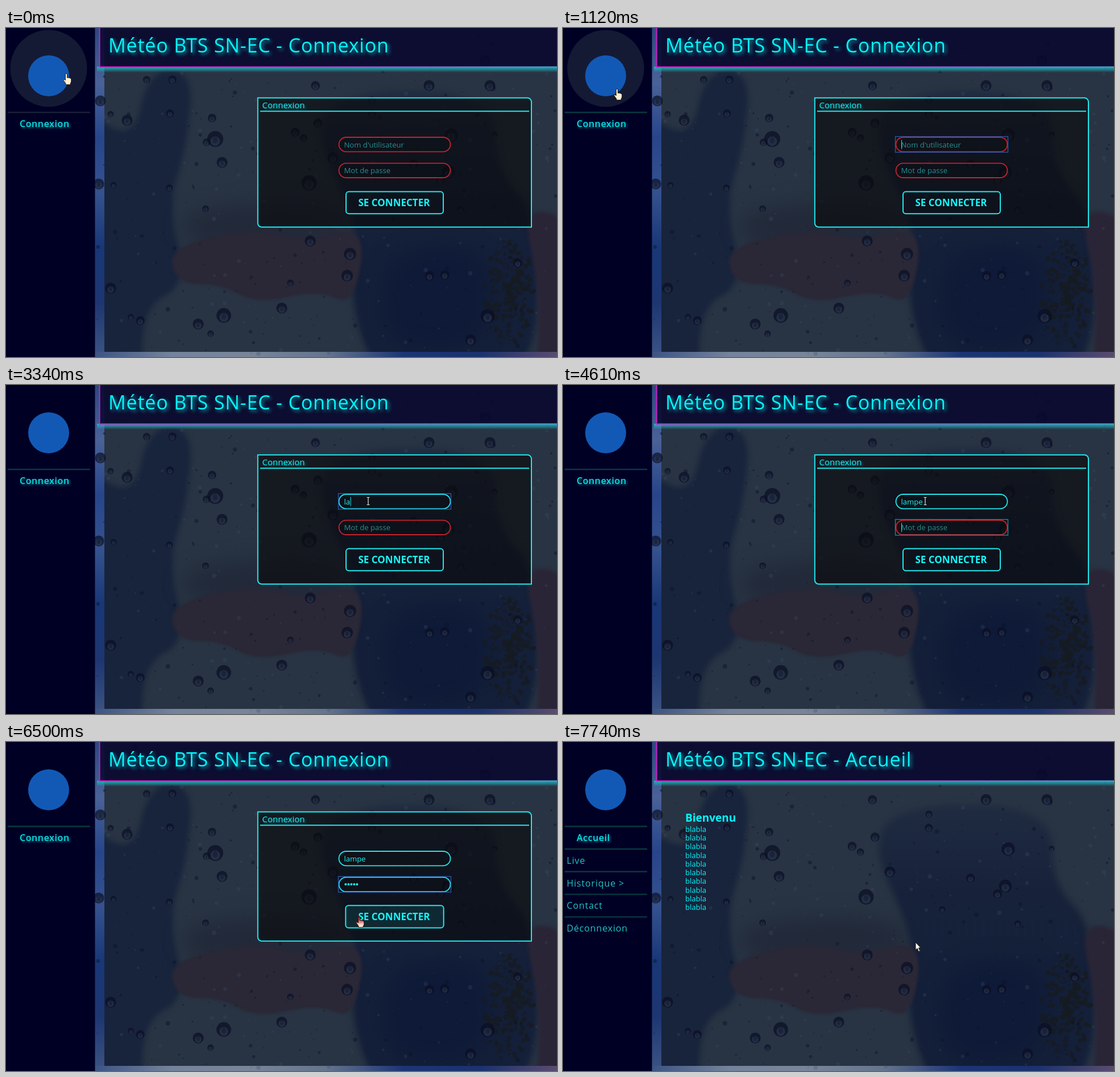
Recreate the animation shown at these times as an HTML page with a canvas. Size 969 by 578 pixels, loop 8000 ms.

```html
<!DOCTYPE html>
<html lang="fr">
<head>
<meta charset="utf-8">
<title>Météo - Connexion</title>
<style>
html, body { margin: 0; width: 100%; height: 100%; overflow: hidden; background: #000025; }
canvas, svg { position: absolute; left: 0; top: 0; width: 969px; height: 578px; }
text { font-family: "Open Sans", "Noto Sans", sans-serif; fill: #18f4f6; white-space: pre; }
.title { font-size: 34px; letter-spacing: .82px; fill: #05f6fb; filter: drop-shadow(3px 3px 3px #079aa5); }
.here { font-size: 16px; font-weight: 600; letter-spacing: .6px; fill: #08dfe2; filter: drop-shadow(2px 2px 2px #067f8c); }
.menu { font-size: 16px; font-weight: 500; letter-spacing: .85px; fill: #22c6c6; }
.legend { font-size: 15px; filter: drop-shadow(2px 2px 2px #067f8c); }
.field { font-size: 13.1px; font-weight: 500; }
.hint { font-weight: 400; fill: #298d90; }
.btn { font-size: 17px; font-weight: 700; }
.h { font-size: 19px; font-weight: 700; fill: #02f8fc; }
.p { font-size: 13px; font-weight: 500; fill: #02f8fc; }
.rule { stroke: #08383f; stroke-width: 2.4; }
.edge { fill: none; stroke: #20e8ec; stroke-width: 2; }
.box { fill: rgba(0,0,0,.12); stroke-width: 1.8; }
.ring { fill: none; stroke-width: 1.3; }
.caret { stroke: #20e8ec; }
</style>
</head>
<body>
<canvas id="photo" width="969" height="578"></canvas>
<svg viewBox="0 0 969 578">
  <defs>
    <linearGradient id="line"><stop stop-color="#d01ec8"/><stop offset=".45" stop-color="#a045c4"/><stop offset="1" stop-color="#4a9cc8"/></linearGradient>
    <linearGradient id="glow" x2="0" y2="1"><stop stop-color="#22c2cc" stop-opacity=".9"/><stop offset=".5" stop-color="#22a8b8" stop-opacity=".6"/><stop offset="1" stop-color="#22a8b8" stop-opacity="0"/></linearGradient>
    <linearGradient id="hot" x2="0" y2="1"><stop stop-color="#c80f0f"/><stop offset=".35" stop-color="#d8453c"/><stop offset=".75" stop-color="#f4d8cc"/><stop offset="1" stop-color="#fff4e8"/></linearGradient>
  </defs>

  <rect width="156.5" height="578" fill="#000025"/>
  <circle id="halo" cx="75" cy="71" r="67.5" fill="#141a34"/>
  <circle cx="75" cy="84" r="36" fill="#1259b6"/>
  <rect id="item" x="2.5" y="148" width="145.5" height="39" fill="#17163c"/>
  <path id="rule" class="rule" d="M3 148.3H148"/>
  <text id="here" class="here" x="24" y="174"></text>

  <rect x="160" y="68" width="809" height="10" fill="url(#glow)"/>
  <rect x="164" width="805" height="69" fill="#08082e" fill-opacity=".86"/>
  <rect x="164" y="67.4" width="805" height="2" fill="url(#line)"/>
  <rect x="163.6" width="2" height="69.4" fill="#cc1ec6"/>
  <text id="title" class="title" x="180" y="43"></text>

  <g id="login">
    <path class="edge" style="fill:rgba(11,12,14,.66)" d="M442.8 122.8H917a7 7 0 0 1 7 7V349.8H449.8a7 7 0 0 1-7-7Z"/>
    <path class="edge" d="M447 146.2H920"/>
    <text class="legend" x="450.5" y="141">Connexion</text>
    <rect class="box" id="userBox" x="585.5" y="192" width="196" height="25.4" rx="12.7"/>
    <rect class="box" id="passBox" x="585.5" y="237.6" width="196" height="25.4" rx="12.7"/>
    <rect class="ring" id="ring" x="584.5" width="198" height="27.6"/>
    <text class="field" id="user" x="594.5" y="209.5"></text>
    <text class="field" id="pass" x="594.5" y="255"></text>
    <g id="dots" fill="#18f4f6"></g>
    <path class="caret" id="caret"/>
    <rect id="button" class="edge" rx="5"/>
    <text id="label" class="btn" x="619.5" y="313">SE CONNECTER</text>
  </g>
  <g id="home"></g>

  <g id="cursor" stroke-linejoin="round">
    <path id="arrow" d="M0 0V13.4L3.1 10.6 5.4 16.2 7.8 15.2 5.4 9.8H9.2Z" fill="#fff8e8" stroke="#111" stroke-width=".9"/>
    <path id="hand" d="M-1.6 1Q0-1 1.6 1V7.4Q3 6.4 4.2 7.6 5.8 6.8 6.6 8.4 8.4 7.8 8.8 10V14Q8.4 16 7.2 17.4V19.6H-1V17.4L-5.2 11.6Q-5.2 9.4-3 10.4L-1.6 12Z" stroke="#16100c" stroke-width=".9"/>
    <path id="beam" d="M-2.5-6.5H2.5M-2.5 6.5H2.5M0-6.5V6.5" fill="none" stroke="#e8e8e0" stroke-width="1.2"/>
  </g>
</svg>
<script>
const $ = id => document.getElementById(id);
const LOOP = 8000, NAME = "lampe", RED = "#c4222c", CYAN = "#20e8ec", BLUE = "#2c58ac", TEAL = "#1f8f96";

// Rainy window: soft colour patches, then drops
const g = $("photo").getContext("2d");
let seed = 17;
const rnd = () => (seed = seed * 16807 % 2147483647) / 2147483647;

function fade(x0, y0, x1, y1, colors) {
  const grad = g.createLinearGradient(x0, y0, x1, y1);
  colors.forEach((c, i) => grad.addColorStop(i / (colors.length - 1), c));
  return grad;
}
function blob(fill, soft, ...pts) {
  const n = pts.length;
  const mid = i => [0, 1].map(k => (pts[i % n][k] + pts[(i + 1) % n][k]) / 2);
  g.filter = `blur(${soft}px)`;
  g.fillStyle = fill;
  g.beginPath();
  g.moveTo(...mid(n - 1));
  for (let i = 0; i < n; i++) g.quadraticCurveTo(...pts[i], ...mid(i));
  g.fill();
  g.filter = "none";
}
function disc(color, x, y, rx, ry = rx) {
  g.fillStyle = color;
  g.beginPath();
  g.ellipse(x, y, rx, ry, 0, 0, 7);
  g.fill();
}
function drop(x, y, r) {
  disc("rgba(9,14,36,.68)", x, y, r);
  disc("rgba(46,60,84,.6)", x, y + r * .28, r * .6);
  disc("rgba(16,23,46,.5)", x, y + r * .15, r * .3, r * .4);
}

g.fillStyle = "#283443";
g.fillRect(156, 0, 813, 578);
blob("#18243c", 5, [250,75], [330,75], [318,210], [285,310], [320,450], [240,490], [240,640], [130,620], [130,140], [225,200]);
blob("#222a3a", 16, [310,310], [600,300], [610,390], [310,390]);
blob(fade(0, 130, 0, 400, ["#1e2a40", "#17223a", "#141f39"]), 6,
  [530,160], [640,105], [860,120], [860,250], [940,330], [930,640], [660,640], [600,470], [625,360]);
blob("#2a2736", 2, [285,385], [440,350], [520,375], [635,345], [612,490], [550,460], [440,485], [380,450], [300,450]);
blob("#0e1a37", 20, [660,400], [850,380], [850,560], [670,570]);
blob("#2a2536", 3, [905,310], [1010,340], [1010,640], [930,640], [940,460]);
for (let i = 0; i < 240; i++) {
  const a = rnd() * 6.28, d = rnd() ** .7;
  disc("rgba(22,27,34,.8)", 884 + Math.cos(a) * d * 44, 465 + Math.sin(a) * d * 95, 1.5 + rnd() * 3);
}
g.fillStyle = fade(0, 0, 0, 578, ["#2c4880", "#4a6298", "#27458a", "#35528f", "#193777", "#1d3672", "#3c5484"]);
g.fillRect(156, 0, 17, 578);
g.fillStyle = fade(156, 0, 969, 0, ["#3c5484", "#74839c", "#788599", "#65758e", "#1c3575", "#1a326e", "#5a4c70"]);
g.fillRect(156, 569, 813, 9);

for (let i = 0; i < 430; i++) {
  disc(rnd() < .6 ? "rgba(10,17,40,.45)" : "rgba(62,78,108,.28)", 158 + rnd() * 811, rnd() * 572, 1 + 3 * rnd() ** 3);
}
for (let i = 0; i < 28; i++) drop(180 + rnd() * 780, 80 + rnd() * 480, 5 + rnd() * 3);
[[368,195], [533,272], [383,505], [847,506], [783,188], [778,253], [605,397], [600,435], [535,374], [485,492], [338,520],
 [380,236], [575,228], [842,57], [851,101], [744,101], [213,162], [184,457], [817,548], [166,128], [163,274]]
  .forEach(([x, y], i) => drop(x, y, 14 - Math.min(i, 8) * .55));

// Repeated parts
$("dots").innerHTML = Array.from(NAME, (_, i) => `<circle cx="${597.3 + 5 * i}" cy="250" r="2"/>`).join("");
$("home").innerHTML = '<text class="h" x="215" y="140">Bienvenu</text>' +
  Array.from({ length: 10 }, (_, i) => `<text class="p" x="215" y="${158 + 15.22 * i}">blabla</text>`).join("") +
  ["Live", "Historique >", "Contact", "Déconnexion"].map((s, i) => {
    const y = 188 + 39.8 * i;
    return `<path class="rule" d="M3 ${y}H148"/><text class="menu" x="6.5" y="${y + 25.7}">${s}</text>`;
  }).join("");

// Cursor legs: start, end, number of jumps, goal
const PATH = [
  [160, 590, 4, 95, 107],
  [1260, 1960, 6, 544, 195],
  [2230, 2630, 4, 637, 204],
  [6200, 6500, 3, 621, 306],
  [6620, 7200, 6, 675, 318],
  [7600, 7740, 2, 620, 352]
];

const within = (t, a, b) => t >= a && t < b;
// Progress 0..1 in n equal jumps, the first at a, the last at b
const jumps = (t, a, b, n) => t < a ? 0 : Math.min(n, 1 + Math.floor((t - a) * (n - 1) / (b - a) + 1e-6)) / n;

function cursorAt(t) {
  let x = 106, y = 80;
  for (const [a, b, n, gx, gy] of PATH) {
    const p = jumps(t, a, b, n) ** 2;
    x += (gx - x) * p;
    y += (gy - y) * p;
  }
  return [x, y];
}
function cursorKind(x, y, home) {
  if (home) return "arrow";
  if (x < 143) return "hand";
  if (within(x, 598, 770) && within(y, 287, 327)) return "hand";
  return within(x, 585, 782) && within(y, 191, 218) ? "beam" : "arrow";
}

const set = (id, attrs) => { for (const k in attrs) $(id).setAttribute(k, attrs[k]); };
const show = (id, on) => { $(id).style.display = on ? "" : "none"; };

function field(id, text, hint, filled) {
  $(id).textContent = filled ? text : hint;
  $(id).classList.toggle("hint", !filled);
  set(id + "Box", { stroke: filled ? CYAN : RED });
}

function draw(t) {
  const home = t >= 7600, page = home ? "Accueil" : "Connexion";
  $("title").textContent = "Météo BTS SN-EC - " + page;
  $("here").textContent = page;
  show("login", !home);
  show("home", home);

  // Sidebar hover fades
  set("halo", { opacity: t < 590 ? 1 : jumps(t, 720, 1120, 3) - jumps(t, 1260, 1820, 5) });
  set("item", { opacity: t < 590 ? 0 : 1 - jumps(t, 720, 1120, 3) });
  $("rule").style.stroke = t < 590 ? "#1a1e38" : "#08383f";

  // Typing
  const user = 4 * jumps(t, 3190, 3620, 4) + (t >= 3900);
  const pass = Math.ceil(3 * jumps(t, 5040, 5170, 2)) + 2 * jumps(t, 5470, 5600, 2);
  field("user", NAME.slice(0, user), "Nom d'utilisateur", user);
  field("pass", "", "Mot de passe", pass);
  [...$("dots").children].forEach((d, i) => { d.style.display = i < pass ? "" : "none"; });

  // Focus
  const onPass = t >= 4610, top = onPass ? 236.3 : 190.7;
  const typed = onPass ? 5 * pass : user && $("user").getComputedTextLength();
  show("ring", within(t, 590, 7320));
  set("ring", { y: top, stroke: within(t, 4610, 4760) ? TEAL : BLUE });
  show("caret", within(t, 590, 1540) || within(t, 3190, 4050) || within(t, 4610, 5600));
  set("caret", { d: `M${595.5 + typed} ${top + 6}v16` });

  // Button
  const f = jumps(t, 6500, 7200, 6);
  set("button", { x: 598 - 4 * f, y: 287.5 - 1.6 * f, width: 171 + 8 * f, height: 38.8 + 3.2 * f });
  $("button").style.fill = `rgba(32,248,252,${f ** 1.3})`;
  $("button").style.filter = f ? `drop-shadow(0 0 5px rgba(32,232,236,${f * f * .85}))` : "none";
  $("label").style.fill = f > .5 ? "#0b1c24" : "#18f4f6";

  const [x, y] = cursorAt(t), kind = cursorKind(x, y, home);
  for (const k of ["arrow", "hand", "beam"]) show(k, k === kind);
  set("hand", { fill: f ? "url(#hot)" : "#fff0d4" });
  set("cursor", { transform: `translate(${x} ${y})` });
}

function tick() {
  draw(performance.now() % LOOP);
  requestAnimationFrame(tick);
}
tick();
</script>
</body>
</html>
```
